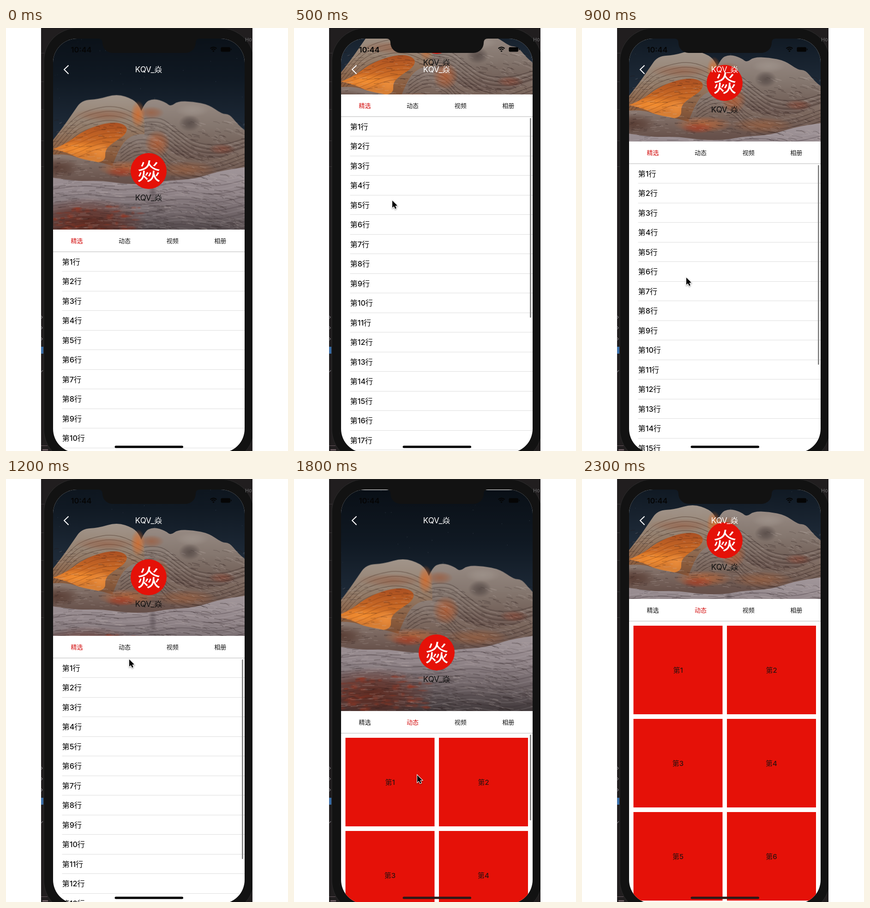
An HTML page with a canvas for the animation above (2.4 s loop, 611 px wide and 917 px high).

```html
<!DOCTYPE html>
<html lang="zh">
<head>
<meta charset="utf-8">
<style>
html, body { margin: 0; width: 100%; height: 100%; overflow: hidden; background: #fff; }
canvas { display: block; }
</style>
</head>
<body>
<canvas id="stage" width="611" height="917"></canvas>
<script>
const ctx = document.getElementById('stage').getContext('2d');
const FONT = 'Inter, "Noto Sans CJK SC", "Noto Sans CJK", sans-serif';
const CJK = '"Noto Sans CJK SC", "Noto Sans CJK", sans-serif';
const RED = '#e51108';
const USER = 'KQV_焱';
const TABS = ['精选', '动态', '视频', '相册'];
const LOOP = 2400, STEP = 100;
const SX = 102, SY = 23, SW = 415, SH = 898, CX = 309.5;
const PHOTO_TOP = -46, PHOTO_H = 456, PHOTO_MID = 181.5;

// time, bottom edge of the header
const HEADER = [[0, 437], [200, 340], [500, 144], [600, 130], [900, 246], [1200, 340],
  [1500, 340], [1800, 503], [2000, 350], [2300, 260]];
// time, x, y of the pointer
const POINTER = [[300, 218, 520], [500, 213, 374], [600, 213, 362], [900, 226, 541],
  [1200, 267, 391], [1500, 254, 377], [1800, 267, 642], [2000, 268, 640]];

function sample(keys, t) {
  let i = 0;
  while (i < keys.length - 2 && t >= keys[i + 1][0]) i++;
  const a = keys[i], b = keys[i + 1];
  const u = Math.min(1, Math.max(0, (t - a[0]) / (b[0] - a[0])));
  const k = u * u * (3 - 2 * u);
  return a.slice(1).map((v, n) => v + (b[n + 1] - v) * k);
}

function makeRandom(seed) {
  return () => (seed = (seed * 16807) % 2147483647) / 2147483647;
}

function rounded(c, x, y, w, h, r, fill) {
  c.beginPath();
  c.roundRect(x, y, w, h, r);
  c.fillStyle = fill;
  c.fill();
}

function text(s, x, y, size, color, weight = 400, align = 'center', family = FONT) {
  ctx.font = `${weight} ${size}px ${family}`;
  ctx.textAlign = align;
  ctx.fillStyle = color;
  ctx.fillText(s, x, y + size * 0.37);
}

// smooth open curve through a flat list of points
function curve(c, p) {
  c.beginPath();
  c.moveTo(p[0], p[1]);
  for (let i = 2; i < p.length - 2; i += 2)
    c.quadraticCurveTo(p[i], p[i + 1], (p[i] + p[i + 2]) / 2, (p[i + 1] + p[i + 3]) / 2);
  c.lineTo(p[p.length - 2], p[p.length - 1]);
}

function gradient(c, y0, y1, ...colors) {
  const g = c.createLinearGradient(0, y0, 0, y1);
  colors.forEach((v, i) => g.addColorStop(i / (colors.length - 1), v));
  return g;
}

function land(c, p, fill, bottom) {
  curve(c, p);
  c.lineTo(p[p.length - 2], bottom);
  c.lineTo(p[0], bottom);
  c.closePath();
  c.fillStyle = fill;
  c.fill();
}

function glow(c, x, y, rx, ry, rgb, a) {
  c.save();
  c.translate(x, y);
  c.scale(rx, ry);
  const g = c.createRadialGradient(0, 0, 0, 0, 0, 1);
  g.addColorStop(0, `rgba(${rgb},${a})`);
  g.addColorStop(0.5, `rgba(${rgb},${a * 0.65})`);
  g.addColorStop(1, `rgba(${rgb},0)`);
  c.fillStyle = g;
  c.fillRect(-1, -1, 2, 2);
  c.restore();
}

function strata(c, p, count, gap, color) {
  c.save();
  c.strokeStyle = color;
  c.lineWidth = 1.4;
  for (let i = 0; i < count; i++) {
    curve(c, p);
    c.stroke();
    c.translate(0, gap);
  }
  c.restore();
}

function specks(c, rnd, count, top, bottom, len) {
  for (let i = 0; i < count; i++) {
    const x = SX + rnd() * SW, y = top + rnd() * (bottom - top), l = len * (0.4 + rnd());
    c.strokeStyle = rnd() < 0.5 ? 'rgba(205,192,188,.22)' : 'rgba(35,22,22,.28)';
    c.lineWidth = 0.8 + rnd();
    c.beginPath();
    c.moveTo(x, y);
    c.quadraticCurveTo(x + l / 2, y + rnd() * 4 - 2, x + l, y + (x - 250) * 0.015 + rnd() * 2);
    c.stroke();
  }
}

function paintPhoto() {
  const cv = document.createElement('canvas');
  cv.width = SW;
  cv.height = PHOTO_H;
  const c = cv.getContext('2d'), rnd = makeRandom(77);
  c.translate(-SX, -PHOTO_TOP);
  c.fillStyle = gradient(c, -46, 170, '#0a1017', '#101923', '#1e2a38');
  c.fillRect(SX, PHOTO_TOP, SW, PHOTO_H);
  for (let i = 0; i < 30; i++) {
    c.fillStyle = `rgba(170,185,200,${0.1 + rnd() * 0.3})`;
    c.fillRect(SX + rnd() * SW, PHOTO_TOP + rnd() * 150, 1, 1);
  }

  // far domes
  const right = [286, 150, 298, 114, 320, 104, 345, 112, 357, 122, 372, 110, 405, 111, 440, 118,
    468, 138, 484, 138, 502, 160, 518, 174];
  const left = [102, 194, 124, 166, 146, 134, 164, 108, 200, 106, 240, 94, 276, 106, 290, 122, 300, 152];
  c.save();
  land(c, right, gradient(c, 100, 290, '#998d86', '#85776f', '#6b5750', '#78604f'), 300);
  c.clip();
  strata(c, [290, 150, 330, 140, 370, 172, 410, 202, 470, 206, 520, 190], 8, 9, 'rgba(48,35,32,.42)');
  strata(c, [290, 154, 330, 144, 370, 176, 410, 206, 470, 210, 520, 194], 8, 9, 'rgba(190,176,166,.25)');
  glow(c, 315, 135, 28, 14, '160,85,50', 0.6);
  glow(c, 398, 158, 24, 18, '50,40,40', 0.5);
  glow(c, 404, 130, 36, 14, '170,160,152', 0.45);
  c.restore();
  c.save();
  land(c, left, gradient(c, 95, 290, '#a2968c', '#94806f', '#8a5b3c', '#55392e'), 300);
  c.clip();
  strata(c, [102, 200, 140, 150, 180, 128, 240, 118, 300, 148], 5, 10, 'rgba(60,38,28,.4)');
  glow(c, 215, 140, 70, 14, '150,80,50', 0.45);
  c.restore();

  // lit hollow
  c.save();
  curve(c, [102, 214, 128, 204, 165, 176, 205, 160, 242, 155, 264, 166, 258, 184, 232, 200,
    214, 216, 216, 240, 180, 246, 140, 224, 102, 214]);
  c.fillStyle = gradient(c, 155, 245, '#a84e22', '#cf6e26', '#d98338');
  c.fill();
  c.clip();
  glow(c, 155, 213, 56, 16, '255,150,50', 0.75);
  glow(c, 205, 218, 22, 18, '245,150,65', 0.7);
  strata(c, [102, 208, 150, 196, 200, 170, 262, 168], 5, 10, 'rgba(110,50,20,.35)');
  c.restore();
  glow(c, 286, 139, 16, 30, '220,105,35', 0.75);

  // middle ridges
  land(c, [102, 226, 130, 224, 165, 236, 210, 244, 250, 256, 300, 280], gradient(c, 222, 285, '#8c7b73', '#665049'), 300);
  land(c, [226, 262, 244, 212, 270, 184, 304, 180, 334, 192, 356, 222, 410, 242, 460, 236, 518, 212],
    gradient(c, 180, 285, '#8e8079', '#7b675d', '#66504a'), 300);
  strata(c, [248, 216, 272, 196, 304, 192, 334, 206, 356, 234, 410, 252, 460, 246, 518, 224], 5, 8, 'rgba(45,30,28,.4)');
  glow(c, 328, 202, 28, 30, '190,85,35', 0.65);
  glow(c, 262, 256, 64, 18, '205,105,50', 0.65);
  glow(c, 390, 258, 70, 18, '170,100,60', 0.55);
  glow(c, 250, 264, 36, 12, '160,48,30', 0.6);
  glow(c, 468, 214, 30, 12, '140,65,45', 0.55);
  glow(c, 112, 254, 50, 22, '70,38,28', 0.6);
  specks(c, rnd, 420, 152, 280, 12);

  // near slope
  c.save();
  land(c, [102, 276, 150, 284, 205, 282, 260, 290, 310, 290, 350, 282, 410, 279, 460, 262, 518, 253],
    gradient(c, 255, 410, '#a1969a', '#92868a', '#6d6265', '#40383a'), 412);
  c.clip();
  for (let i = 0; i < 15; i++) {
    const y = 286 + i * 9;
    c.strokeStyle = i % 2 ? 'rgba(50,40,45,.32)' : 'rgba(200,190,195,.2)';
    c.lineWidth = 1.5;
    curve(c, [102, y + 6, 170, y - 5, 235, y + 8, 310, y + 3, 380, y - 12, 450, y + 2, 518, y - 14]);
    c.stroke();
  }
  glow(c, 175, 374, 130, 56, '95,36,24', 0.85);
  for (let i = 0; i < 80; i++)
    glow(c, 104 + rnd() * 190, 338 + rnd() * 70, 5 + rnd() * 9, 2 + rnd() * 4, '150,52,32', 0.4);
  glow(c, 318, 305, 9, 26, '60,50,56', 0.4);
  specks(c, rnd, 650, 268, 410, 18);
  c.restore();
  return cv;
}

const photo = paintPhoto();

function drawDesktop() {
  ctx.fillStyle = '#fff';
  ctx.fillRect(0, 0, 611, 917);
  ctx.fillStyle = '#211e1f';
  ctx.fillRect(76, 0, 458, 917);
  ctx.fillStyle = '#3a3738';
  for (const y of [54, 116, 176, 244, 300]) ctx.fillRect(76, y, 7, 1);
  ctx.strokeStyle = '#77757a';
  ctx.lineWidth = 1.3;
  ctx.beginPath();
  for (const y of [627, 650, 674]) {
    ctx.moveTo(76, y - 3);
    ctx.lineTo(79, y);
    ctx.lineTo(76, y + 3);
  }
  ctx.moveTo(76, 746);
  ctx.lineTo(80, 742);
  ctx.stroke();
  ctx.fillStyle = '#3a6ea8';
  ctx.fillRect(76, 691, 5, 15);
  ctx.fillStyle = '#6a5a60';
  ctx.fillRect(76, 905, 14, 1);
  ctx.fillRect(79, 913, 12, 3);
}

function drawBody() {
  ctx.save();
  ctx.beginPath();
  ctx.rect(76, 0, 458, 917);
  ctx.clip();
  rounded(ctx, 81.5, 0, 456, 942, 72, '#2a2a2a');
  rounded(ctx, 82.5, 1, 454, 940, 71, '#121212');
  text('Ho', 518, 25, 11, '#6b6b6d', 400, 'left');
  ctx.restore();
}

function drawHeader(h) {
  const height = h - SY, s = Math.max(1, height / PHOTO_H);
  ctx.save();
  ctx.beginPath();
  ctx.rect(SX, SY, SW, height);
  ctx.clip();
  ctx.translate(CX, SY + height / 2);
  ctx.scale(s, s);
  ctx.drawImage(photo, -SW / 2, PHOTO_TOP - PHOTO_MID);
  ctx.restore();
  ctx.beginPath();
  ctx.arc(309, h - 127, 39, 0, Math.PI * 2);
  ctx.fillStyle = RED;
  ctx.fill();
  text('焱', 309.5, h - 126, 51, '#fff', 300, 'center', CJK);
  text(USER, 309, h - 69, 17, '#111');
}

function drawTabs(h, active) {
  ctx.fillStyle = '#fff';
  ctx.fillRect(SX, h, SW, 48);
  TABS.forEach((s, i) =>
    text(s, 153.5 + i * 103.6, h + 24.5, 13, i === active ? '#d30d0d' : '#111', 500));
  ctx.fillStyle = '#c4c4c4';
  ctx.fillRect(SX, h + 47.5, SW, 1.2);
}

function drawList(top) {
  for (let i = 0; top + i * 42.5 < 917; i++) {
    const y = top + i * 42.5;
    text(`第${i + 1}行`, 121.5, y + 21.8, 16.2, '#0a0a0a', 500, 'left');
    ctx.fillStyle = '#dedede';
    ctx.fillRect(121.5, Math.round(y + 42), SX + SW - 121.5, 1);
  }
}

function drawGrid(top) {
  for (let i = 0; top + 10 + (i >> 1) * 202 < 917; i++) {
    const x = 111.5 + (i % 2) * 202.5, y = top + 10 + (i >> 1) * 202;
    ctx.fillStyle = RED;
    ctx.fillRect(x, y, 193, 192);
    text(`第${i + 1}`, x + 96.5, y + 96.5, 15, '#2a1210', 500);
  }
}

function drawNotch() {
  ctx.fillStyle = '#121212';
  ctx.beginPath();
  ctx.moveTo(200, 22);
  ctx.lineTo(200, 23);
  ctx.quadraticCurveTo(209, 23, 209, 32);
  ctx.arcTo(209, 54, 231, 54, 22);
  ctx.arcTo(411, 54, 411, 32, 22);
  ctx.lineTo(411, 32);
  ctx.quadraticCurveTo(411, 23, 420, 23);
  ctx.lineTo(420, 22);
  ctx.fill();
}

function drawStatus() {
  text('10:44', 163, 47, 16.5, '#050505', 600);
  ctx.strokeStyle = '#050505';
  ctx.lineWidth = 2.2;
  for (const r of [5.6, 9.4]) {
    ctx.beginPath();
    ctx.arc(449.5, 51, r, -Math.PI * 0.76, -Math.PI * 0.24);
    ctx.stroke();
  }
  ctx.beginPath();
  ctx.moveTo(449.5, 52);
  ctx.arc(449.5, 52, 3.2, -Math.PI * 0.76, -Math.PI * 0.24);
  ctx.fillStyle = '#050505';
  ctx.fill();
  rounded(ctx, 465.5, 41.5, 20.5, 10, 2.5, '#050505');
  rounded(ctx, 487, 44.5, 1.5, 4, 0.7, '#050505');

  ctx.strokeStyle = '#fff';
  ctx.lineWidth = 2;
  ctx.beginPath();
  ctx.moveTo(135.5, 81);
  ctx.lineTo(126, 90);
  ctx.lineTo(135.5, 99.5);
  ctx.stroke();
  text(USER, 309, 90, 17, '#fff');
}

function drawPointer([x, y]) {
  ctx.save();
  ctx.translate(x, y);
  ctx.beginPath();
  ctx.moveTo(0, 0);
  for (const [px, py] of [[0, 15.5], [3.6, 12.4], [6.2, 18], [8.8, 16.8], [6.3, 11.4], [11, 11]])
    ctx.lineTo(px, py);
  ctx.closePath();
  ctx.shadowColor = 'rgba(0,0,0,.4)';
  ctx.shadowBlur = 3;
  ctx.shadowOffsetY = 1.5;
  ctx.strokeStyle = '#fff';
  ctx.lineWidth = 2;
  ctx.stroke();
  ctx.shadowColor = 'transparent';
  ctx.fillStyle = '#000';
  ctx.fill();
  ctx.restore();
}

function draw(t) {
  const h = Math.round(sample(HEADER, t)[0]);
  const grid = t >= 1400;
  const scrolling = (t >= 300 && t <= 1200) || (t >= 1600 && t <= 2100);
  drawDesktop();
  drawBody();
  ctx.save();
  ctx.beginPath();
  ctx.roundRect(SX, SY, SW, SH, 52);
  ctx.clip();
  ctx.fillStyle = '#fff';
  ctx.fillRect(SX, SY, SW, SH);
  (grid ? drawGrid : drawList)(h + 48);
  drawHeader(h);
  drawTabs(h, grid ? 1 : 0);
  if (scrolling) rounded(ctx, 511, h + 51, 3, grid ? 186 : 433, 1.5, '#8c8c8c');
  drawStatus();
  rounded(ctx, 235.5, 905.5, 148.5, 5, 2.5, grid ? '#2b1a18' : '#000');
  ctx.restore();
  drawNotch();
  if (t >= 300 && t <= 2000) drawPointer(sample(POINTER, t));
}

const start = performance.now();
function tick() {
  const t = (performance.now() - start) % LOOP;
  draw(Math.floor(t / STEP) * STEP);
  requestAnimationFrame(tick);
}
tick();
</script>
</body>
</html>
```
